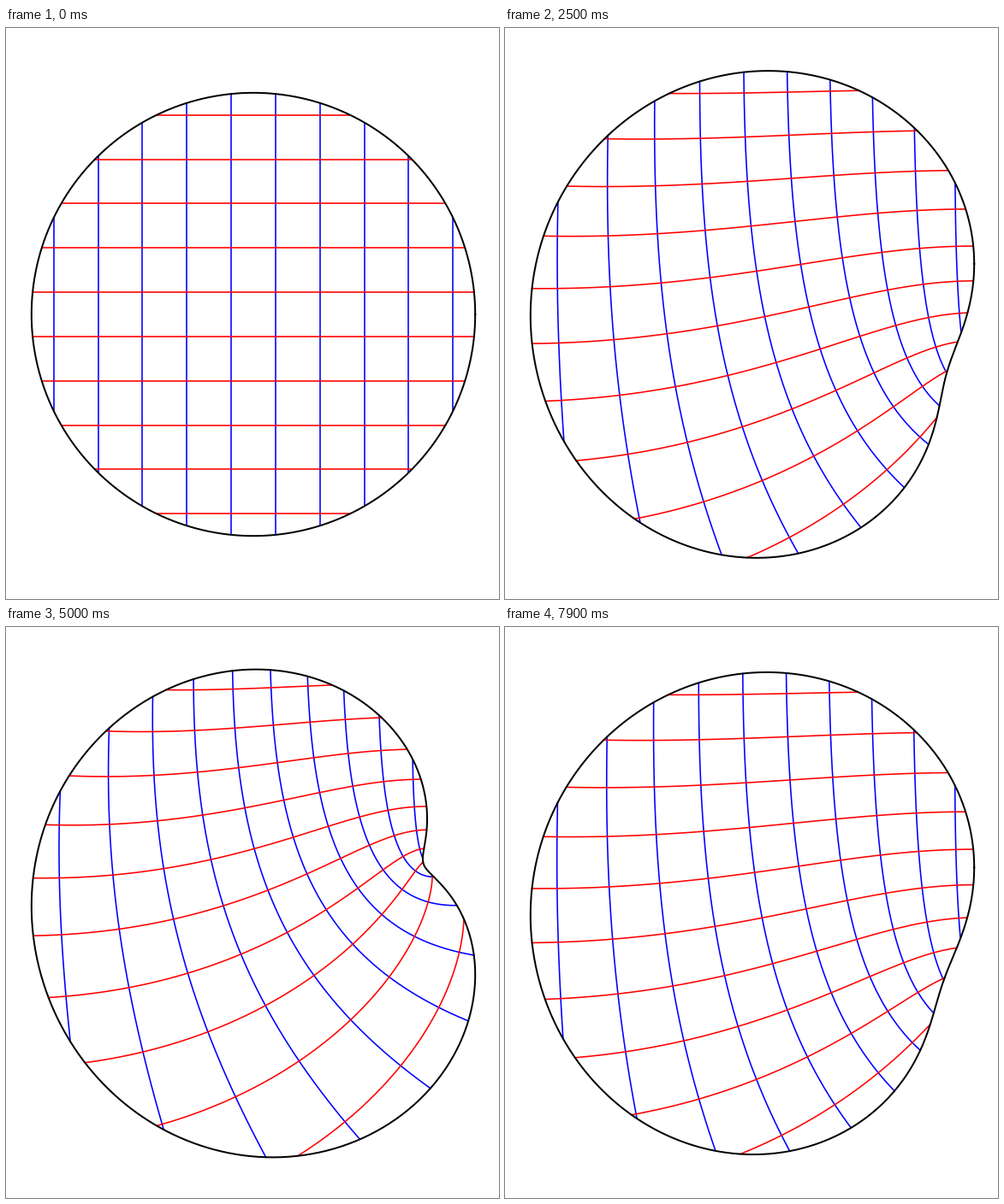
A matplotlib script that plays this animation: 576x668 px, repeating every 8000 ms.

```python
import numpy as np
import matplotlib.pyplot as plt
from matplotlib.animation import FuncAnimation

W, H, DPI = 576, 668, 100
SPAN = 518.4            # width of the drawn region
CX, CY = 289, 335
STEPS, HOLD, FRAMES = 50, 2, 80

# Taylor coefficients of the holomorphic displacement, from z^1 up
COEFS = [0.105 + 0.390j, -0.3432, 0.0128 - 0.1606j, 0.0585,
         0.001 + 0.0198j, -0.0055, -0.0009j]


def warp(z, t):
    return z + t * sum(c * z ** n for n, c in enumerate(COEFS, 1))


def px(points):
    return points * 72 / DPI


circle = np.exp(1j * np.linspace(0, 2 * np.pi, 721))
levels = np.arange(-9, 10, 2) / 10
chord = np.linspace(-1, 1, 121)
half = np.sqrt(1 - levels ** 2)
vertical = [a + 1j * h * chord for a, h in zip(levels, half)]
horizontal = [h * chord + 1j * a for a, h in zip(levels, half)]

fig = plt.figure(figsize=(W / DPI, H / DPI), dpi=DPI, facecolor="white")
ax = fig.add_axes([0, 0, 1, 1])
ax.set_xlim(0, W)
ax.set_ylim(H, 0)
ax.axis("off")


def curves(paths, color, width):
    return [(z, ax.plot([], [], color=color, lw=px(width))[0]) for z in paths]


parts = (curves(vertical, "#0000ff", 1.6) + curves(horizontal, "#ff0000", 1.6)
         + curves([circle], "black", 2))


def progress(i):
    step = i if i <= STEPS else min(STEPS, 2 * STEPS + HOLD - i)
    return step / STEPS


def draw(i):
    t = progress(i)
    rim = warp(circle, t)
    x0, x1 = rim.real.min(), rim.real.max()
    y0, y1 = rim.imag.min(), rim.imag.max()
    scale = SPAN / (x1 - x0)
    for z, line in parts:
        w = warp(z, t)
        line.set_data(CX + scale * (w.real - (x0 + x1) / 2),
                      CY - scale * (w.imag - (y0 + y1) / 2))
    return [line for _, line in parts]


anim = FuncAnimation(fig, draw, frames=FRAMES, interval=100,
                     repeat=True, repeat_delay=0)
plt.show()
```
